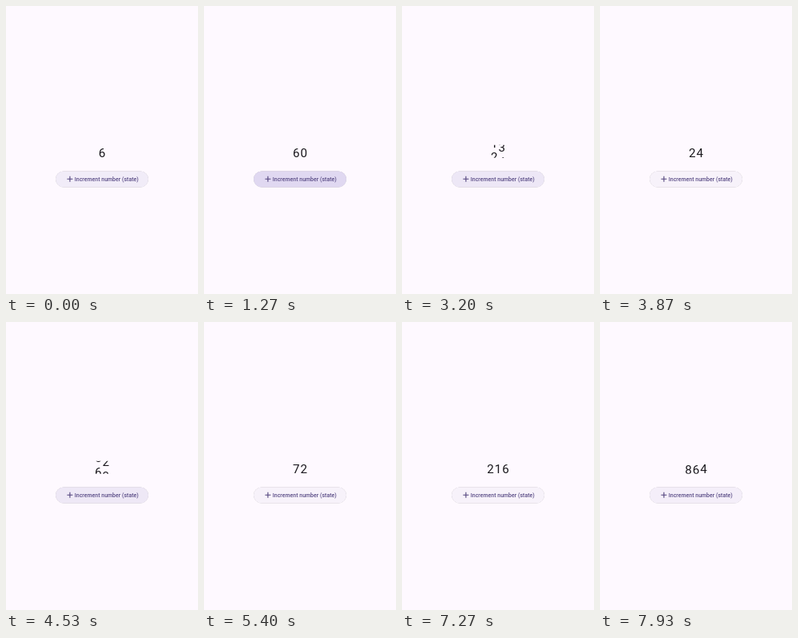
An HTML page for the animation above (8 s loop, 240 by 360 pixels).

```html
<!DOCTYPE html>
<html lang="en">
<head>
<meta charset="utf-8">
<title>Rolling number</title>
<style>
  html, body { margin: 0; width: 100%; height: 100%; overflow: hidden; background: #fef9ff; }
  svg { display: block; width: 240px; height: 360px; }
  text { font-family: Roboto, sans-serif; }
  .digit { font-size: 15.2px; fill: #1a181d; text-anchor: middle; }
  .label { font-size: 6.9px; font-weight: 500; letter-spacing: .05px; fill: #584a85; }
  #button { filter: drop-shadow(0 .6px .6px rgba(0, 0, 0, .28)); }
</style>
</head>
<body>
<svg viewBox="0 0 240 360">
  <defs>
    <clipPath id="window"><rect x="90" y="173.7" width="60" height="16.1"/></clipPath>
  </defs>
  <g id="number" clip-path="url(#window)"></g>
  <rect id="button" x="62" y="206.5" width="116" height="20" rx="10"/>
  <path d="M76.4 216.3h7M79.9 212.8v7" stroke="#50427c" stroke-width="1.1"/>
  <text class="label" x="85.8" y="218.9">Increment number (state)</text>
</svg>
<script>
const LOOP = 8000, ROLL = 300, PRESS = 110, FADE = 330;
const ROW = 17.8, COLUMN = 9.6, BASELINE = 189;
const IDLE = [247, 242, 250], PRESSED = [224, 216, 241];

// A new column appears as 0 and then rolls together with the others.
const taps = [
  { at: -250, from: '6', to: '6' },
  { at: 1265, from: '60', to: '12' },
  { at: 3015, from: '12', to: '24' },
  { at: 4334, from: '24', to: '72' },
  { at: 6000, from: '720', to: '216' },
  { at: 7650, from: '216', to: '864' }
];

const clamp = v => Math.min(1, Math.max(0, v));
const mix = (a, b, p) => a + (b - a) * p;

function easeInOut(x) {
  // cubic-bezier(.42, 0, .58, 1)
  let lo = 0, hi = 1;
  for (let i = 0; i < 20; i++) {
    const s = (lo + hi) / 2;
    const bx = 3 * (1 - s) * (1 - s) * s * .42 + 3 * (1 - s) * s * s * .58 + s * s * s;
    if (bx < x) lo = s; else hi = s;
  }
  return lo * lo * (3 - 2 * lo);
}

const svg = (name, parent) =>
  parent.appendChild(document.createElementNS('http://www.w3.org/2000/svg', name));

const number = document.getElementById('number');
const button = document.getElementById('button');
const columns = Array.from({ length: 3 }, () => {
  const column = svg('g', number);
  for (let d = 0; d < 10; d++) {
    const text = svg('text', column);
    text.setAttribute('class', 'digit');
    text.setAttribute('y', BASELINE + d * ROW);
    text.textContent = d;
  }
  return column;
});

function highlight(t) {
  return Math.max(...taps.map(({ at }) =>
    t < at ? clamp(1 - (at - t) / PRESS) : clamp(1 - (t - at) / FADE)));
}

function draw(t) {
  const { at, from, to } = taps.filter(tap => tap.at <= t).pop();
  const x = clamp((t - at) / ROLL);
  const p = x < 1 ? easeInOut(x) : 1;
  columns.forEach((column, i) => {
    const shown = i < to.length;
    column.style.display = shown ? '' : 'none';
    if (!shown) return;
    const cx = 120 + (i - (to.length - 1) / 2) * COLUMN;
    const value = mix(+from[i], +to[i], p);
    column.setAttribute('transform', `translate(${cx} ${-value * ROW})`);
  });
  const h = highlight(t);
  button.setAttribute('fill', `rgb(${IDLE.map((c, i) => Math.round(mix(c, PRESSED[i], h)))})`);
}

const start = performance.now();
function tick() {
  draw((performance.now() - start) % LOOP);
  requestAnimationFrame(tick);
}
tick();
</script>
</body>
</html>
```
